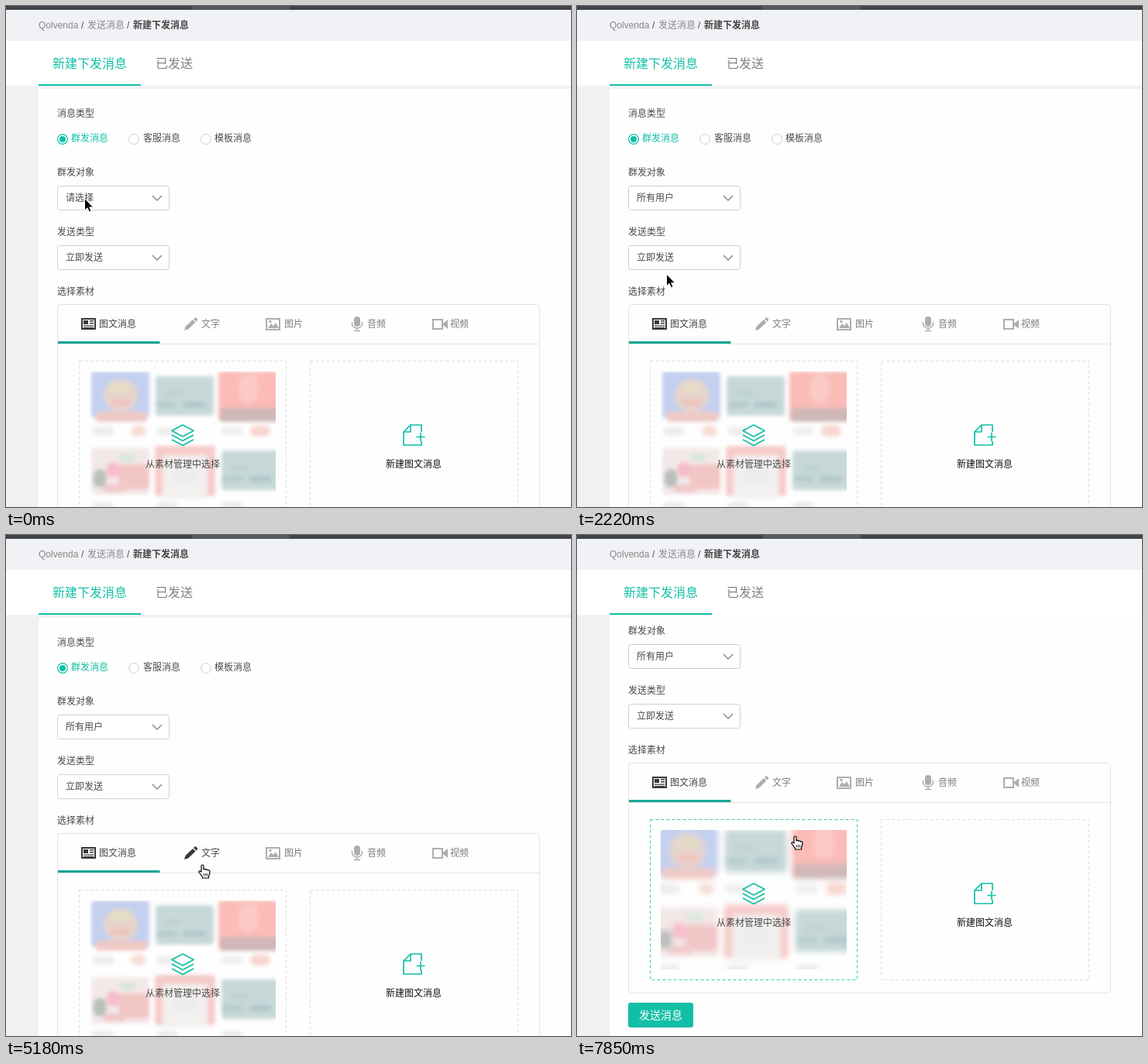
An HTML page that plays this animation: 729 by 647 pixels, repeating every 7.99 s.

```html
<!DOCTYPE html>
<html lang="zh">
<head>
<meta charset="utf-8">
<style>
html, body { margin: 0; height: 100%; overflow: hidden; background: #f0f1f3 }
svg { display: block; width: 729px; height: 647px }
text { font: 12px "Liberation Sans", "Noto Sans CJK SC", "Noto Sans CJK", sans-serif; fill: #4a4a4a }
.big { font-size: 16px; fill: #808080 }
.teal { fill: #12bfa6 }
.line { fill: none; stroke: #12bfa6; stroke-width: 1.7; stroke-linejoin: round }
.box { fill: #fff; stroke: #c6d3d7 }
.arrow { fill: none; stroke: #7d8388; stroke-width: 1.3 }
.on .box, .on .arrow { stroke: #12bfa6 }
.on .box { filter: drop-shadow(0 1px 1px #12bfa655) }
.menu > .box { stroke: #e0e4e6; filter: drop-shadow(0 1px 2px #0003) }
.tab { color: #adadad }
.tab text { fill: #7c7c7c }
.tab.on { color: #383838 }
.tab.on text { fill: #444 }
.tab .s { fill: none; stroke: currentColor; stroke-width: 2 }
.tab .f { fill: currentColor }
.card { fill: none; stroke: #dedede; stroke-dasharray: 4 3 }
.card.on { stroke: #3fcbb8 }
</style>
</head>
<body>
<svg viewBox="0 0 729 647">
  <defs>
    <filter id="soft" x="-10%" y="-10%" width="120%" height="120%"><feGaussianBlur stdDeviation="2.6"/></filter>
    <clipPath id="pic"><path d="M108 472h240v180h-240z"/></clipPath>
  </defs>
  <rect width="729" height="647" fill="#f0f1f3"/>

  <g id="page">
    <rect x="42" y="107" width="687" height="700" fill="#fefefe"/>
    <text x="66" y="143">消息类型</text>
    <circle cx="73" cy="172" r="6.4" fill="#fff" stroke="#12bfa6" stroke-width="1.2"/>
    <circle cx="73" cy="172" r="4" class="teal"/>
    <circle cx="165" cy="172" r="6.4" fill="#fff" stroke="#ccc"/>
    <circle cx="258" cy="172" r="6.4" fill="#fff" stroke="#ccc"/>
    <text x="84" y="175" class="teal">群发消息</text>
    <text x="177" y="175">客服消息</text>
    <text x="269" y="175">模板消息</text>

    <text x="66" y="219">群发对象</text>
    <g id="sel1">
      <rect class="box" x="66.5" y="232.5" width="144" height="31" rx="3"/>
      <path class="arrow" d="M189 245l6 6 6-6"/>
      <text id="choice" x="77" y="252"></text>
    </g>
    <text x="66" y="296">发送类型</text>
    <g id="sel2">
      <rect class="box" x="66.5" y="309.5" width="144" height="31" rx="3"/>
      <path class="arrow" d="M189 322l6 6 6-6"/>
      <text x="77" y="329">立即发送</text>
    </g>
    <text x="66" y="373">选择素材</text>

    <rect x="66.5" y="385.5" width="622" height="297" rx="4" fill="#fefefe" stroke="#dfe3e6"/>
    <path d="M67 436.5h621" stroke="#dfe3e6"/>
    <path d="M67 433h131.500v3h-131.500z" fill="#14a793"/>
    <g class="tab on">
      <path class="s" d="M98 404h17v13h-17z"/>
      <path class="f" d="M100 406h6v5h-6zM108 406h5v1.500h-5zM108 409h5v1.500h-5zM100 412.500h13v1.200h-13zM100 415h13v1h-13z"/>
      <text x="120" y="415">图文消息</text>
    </g>
    <g class="tab" id="word">
      <path class="f" d="M230 419l1.500-5 9.500-9 3.500 3.500-9.500 9zM242 404l1.500-1.500q1-.7 2 .2l1.200 1.200q1 1 .2 2l-1.500 1.500z"/>
      <text x="252" y="415">文字</text>
    </g>
    <g class="tab">
      <path class="s" d="M336 404h17v14h-17z"/>
      <path class="f" d="M338 416l4-6 3 3 3-4 4 7z"/><circle class="f" cx="341" cy="407.500" r="1.700"/>
      <text x="359" y="415">图片</text>
    </g>
    <g class="tab">
      <rect class="f" x="449" y="401" width="8" height="13" rx="4"/>
      <path class="s" style="stroke-width:1.500" d="M446.500 408v2a6.500 6 0 0 0 13 0v-2M453 416v4M449 419.500h8"/>
      <text x="466" y="415">音频</text>
    </g>
    <g class="tab">
      <path class="s" d="M551 405h12v12h-12z"/>
      <path class="f" d="M564 410l6-5v12l-6-5z"/>
      <text x="573" y="415">视频</text>
    </g>

    <g clip-path="url(#pic)"><g id="thumbs" filter="url(#soft)"></g></g>
    <rect class="card" id="card" x="94.5" y="458.5" width="267" height="207"/>
    <rect class="card" x="392.5" y="458.5" width="268" height="207"/>
    <path class="line" d="M228 541l14 7.500-14 7.500-14-7.500zM214 554l14 7.500 14-7.500M214 560l14 7.500 14-7.500"/>
    <text x="180" y="596">从素材管理中选择</text>
    <path class="line" d="M536 550v-9h-14l-9 9v17h23v-5M522 541v9h-9M535 551v11M529.500 556.500h11"/>
    <text x="490" y="596" style="fill:#111">新建图文消息</text>
    <rect x="66" y="695" width="84" height="32" rx="3" class="teal"/>
    <text x="80" y="716" style="font-size:14px;font-weight:500;fill:#fff">发送消息</text>
  </g>

  <g class="menu" id="menu1">
    <rect class="box" x="66.5" y="268.5" width="144" height="298" rx="3"/>
    <path d="M75 270h80v30h-80z" fill="#f7f7f7"/>
    <path d="M67 301.500h143" stroke="#e3e6e8"/>
    <path d="M82.500 287l3.500 3.500" stroke="#777" stroke-width="1.600"/>
    <circle cx="80" cy="284.500" r="3.200" fill="none" stroke="#777" stroke-width="1.300"/>
    <text x="95" y="289" style="fill:#b9b9b9">关键字搜索</text>
    <path d="M67 302h136v33h-136z" fill="#e5fcf5"/>
    <rect x="204" y="304" width="4" height="62" rx="2" fill="#999"/>
  </g>
  <g class="menu" id="menu2">
    <rect class="box" x="66.5" y="341.5" width="144" height="68" rx="3"/>
    <path d="M67 343h143v33h-143z" fill="#e5fcf5"/>
  </g>

  <path d="M0 45h729v58h-729z" fill="#fff"/>
  <path d="M0 5h729v40h-729z" fill="#f0f2f5"/>
  <path d="M0 0h729v5h-729z" fill="#40444c"/>
  <path d="M240 0h126v5h-126z" fill="#555961"/>
  <text x="42" y="29" style="fill:#888">Qolvenda</text>
  <text x="97" y="29">/</text>
  <text x="105" y="29" style="fill:#888">发送消息</text>
  <text x="156" y="29">/</text>
  <text x="164" y="29" style="font-weight:bold;fill:#444">新建下发消息</text>
  <text x="60" y="80" class="big" style="fill:#12bfa6">新建下发消息</text>
  <text x="193" y="80" class="big">已发送</text>
  <path d="M42 101h132v2h-132z" class="teal"/>

  <g id="cursor" stroke-linejoin="round">
    <path id="pointer" d="M-.5-.5v15.500l3.500-3.300 2.500 5.300 2.500-1.100-2.300-5h4.800z" fill="#000" stroke="#fff"/>
    <g id="hand">
      <path d="M-2 9V1.500a1.500 1.500 0 0 1 3 0V6c.3-1 2.700-.8 2.900.4.500-.8 2.500-.5 2.700.7.800-.6 2.400-.2 2.400 1.200 0 3-.3 4-1.500 6V17H-.5v-1.500C-2 13.500-3.500 11.500-5 9.500c-.6-1.400 1-2.200 2-1.200z" fill="#fff" stroke="#000" stroke-width="1.200"/>
      <path d="M1.500 11v3.500M3.500 11v3.500M5.500 11v3.500" stroke="#000" stroke-width=".8"/>
    </g>
  </g>
</svg>
<script>
const $ = id => document.getElementById(id);
const LOOP = 7990, STEPS = 54;

const options = (menu, y, names) => names.forEach((name, i) =>
  $(menu).insertAdjacentHTML('beforeend', `<text x="79" y="${y + 33 * i}">${name}</text>`));
options('menu1', 323, ['请选择', '所有用户', '星标组', '广州深圳', '奖品互动', 'QVD客户', 'QVD已付费', '非QVD客户']);
options('menu2', 364, ['立即发送', '定时发送']);

// Blurred thumbnails: rounded blobs as x, y, width, height, colour
const blob = (x, y, w, h, fill, r = 4) =>
  `<rect x="${x}" y="${y}" width="${w}" height="${h}" rx="${r}" fill="${fill}"/>`;
const oval = (x, y, w, h, fill) => blob(x - w / 2, y - h / 2, w, h, fill, Math.min(w, h) / 2);
const teal = (x, y, w) => blob(x, y, w, 51, '#c8d8d8') + oval(x + 14, y + 37, 26, 7, '#b3cacc') +
  oval(x + 50, y + 37, 30, 8, '#b0c8cc') + oval(x + 24, y + 22, 24, 7, '#bdd1d2');
$('thumbs').innerHTML =
  blob(110, 472, 75, 60, '#c3d0ef') + blob(116, 524, 66, 13, '#efc9c5') +
  oval(148, 503, 44, 42, '#e6d4ce') + oval(148, 492, 28, 12, '#e4dcc4') + oval(148, 512, 26, 10, '#efc3bd') +
  teal(193, 478, 75) +
  blob(274, 472, 78, 64, '#fbbbb7') + oval(313, 494, 26, 38, '#fcc9c5') + blob(276, 519, 76, 18, '#cfb8b7') +
  oval(125, 549, 28, 11, '#ececec') + oval(171, 549, 20, 13, '#f8ddd6') + oval(208, 549, 28, 11, '#eee') +
  oval(292, 549, 28, 10, '#f0eded') + oval(328, 549, 26, 14, '#f8d6d0') +
  blob(110, 571, 75, 60, '#f3e8e8') + blob(145, 592, 40, 32, '#f3c6c6') + oval(121, 610, 17, 24, '#b9bfbb') +
  oval(138, 599, 18, 20, '#f8bccb') + oval(157, 583, 22, 10, '#d9e6df') + oval(140, 623, 30, 10, '#f2c8c8') +
  blob(192, 568, 78, 65, '#f6cbc9') + blob(202, 580, 58, 56, '#f3f0f0') + oval(231, 604, 36, 28, '#eeeded') +
  teal(278, 574, 74) +
  [125, 208, 292].map(x => oval(x, 646, 28, 11, '#ebebeb')).join('');

// step, x, y of the pointer tip
const path = [
  [0, 102, 249], [4, 102, 249], [10, 107, 325], [13, 109, 354], [14, 109, 354],
  [18, 137, 325], [24, 137, 325], [26, 136, 354], [28, 136, 354], [29, 134, 359],
  [35, 254, 426], [40, 254, 426], [43, 255, 333], [45, 256, 322], [49, 256, 322], [53, 282, 389]
];
const fade1 = [[2, 0], [3, .5], [4, 1], [13, 1], [14, .5], [15, 0]];
const fade2 = [[20, 0], [21, .85], [22, 1], [27, 1], [28, .4], [29, 0]];
const scroll = [[38, 0], [39, 34], [40, 78], [41, 91]];

function at(keys, n, k = 1) {
  const i = keys.findIndex(key => key[0] >= n);
  if (i < 0) return keys[keys.length - 1][k];
  if (i === 0) return keys[0][k];
  const a = keys[i - 1], b = keys[i];
  return a[k] + (b[k] - a[k]) * (n - a[0]) / (b[0] - a[0]);
}

function draw(now) {
  const n = Math.min(STEPS - 1, Math.floor((now % LOOP + 15) * STEPS / LOOP));
  const during = (a, b) => n >= a && n <= b;
  const hover = during(40, 43) || n >= 51;
  const arrow = n === 0 || during(15, 16) || during(29, 31);

  $('page').setAttribute('transform', `translate(0 ${-at(scroll, n)})`);
  $('sel1').classList.toggle('on', during(1, 14));
  $('sel2').classList.toggle('on', during(18, 28));
  $('choice').textContent = n < 14 ? '请选择' : '所有用户';
  $('menu1').style.opacity = at(fade1, n);
  $('menu2').style.opacity = at(fade2, n);
  $('word').classList.toggle('on', during(33, 39) || during(43, 50));
  $('card').classList.toggle('on', hover);
  $('thumbs').setAttribute('transform', hover ? 'translate(228 562) scale(1.07) translate(-228 -562)' : '');
  $('soft').firstChild.setAttribute('stdDeviation', hover ? 3.6 : 2.6);
  $('cursor').setAttribute('transform', `translate(${at(path, n)} ${at(path, n, 2)})`);
  $('pointer').style.display = arrow ? '' : 'none';
  $('hand').style.display = arrow ? 'none' : '';
}

const start = performance.now();
(function tick() {
  draw(performance.now() - start);
  requestAnimationFrame(tick);
})();
</script>
</body>
</html>
```
